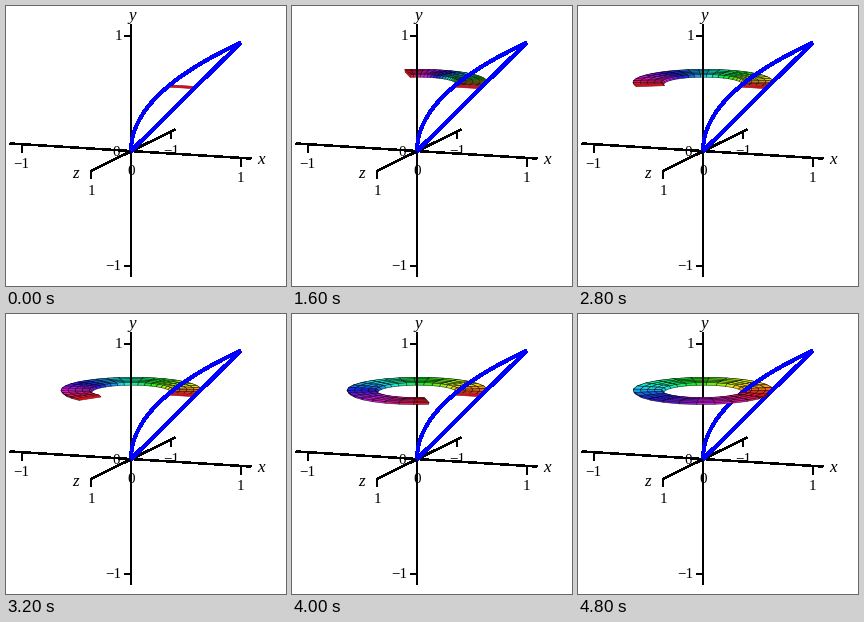
Recreate the animation shown at these times as a matplotlib script. Size 280 by 280 pixels, loop 5 s.

```python
import colorsys

import matplotlib.pyplot as plt
import numpy as np
from matplotlib.animation import FuncAnimation
from matplotlib.collections import PolyCollection

SIZE, DPI = 280, 100
PX = 72 / DPI  # points per pixel
FRAMES, INTERVAL = 25, 200
LOW, HIGH = 0.58, 0.60  # heights bounding the thin slice
RINGS, SECTORS = 4, 24
SLICE_RED, SLICE_EDGE = "#d0101a", "#8a1014"
GRID = (0, 0, 0, 0.75)

ORIGIN = np.array([125.0, 145.0])
BASIS = np.array([[109.5, 6.8], [0.0, -115.0], [-40.0, 20.0]])


def project(x, y, z):
    """Parallel projection from space to stage pixels."""
    return ORIGIN + np.stack(np.broadcast_arrays(x, y, z), axis=-1) @ BASIS


def revolve(radius, height, angle):
    return project(radius * np.cos(angle), height, -radius * np.sin(angle))


def nearness(x, z):
    """Grows towards the viewer."""
    return 40 * x + 109.5 * z


fig = plt.figure(figsize=(SIZE / DPI, SIZE / DPI), dpi=DPI, facecolor="white")
ax = fig.add_axes([0, 0, 1, 1])
ax.set(xlim=(0, SIZE), ylim=(SIZE, 0))
ax.axis("off")


def stroke(points, color="black", width=1.5, zorder=2.0):
    x, y = np.transpose(points)
    ax.plot(x, y, color=color, lw=width * PX, zorder=zorder,
            antialiased=False, solid_capstyle="butt", solid_joinstyle="round")


def label(x, baseline, text, size=15, style="normal"):
    ax.text(x, baseline, text, family="Liberation Serif", style=style,
            size=size * PX, ha="center", va="baseline", zorder=2)


def polygons(zorder):
    return ax.add_collection(
        PolyCollection([], linewidths=0.6 * PX, zorder=zorder), autolim=False)


def draw_axes():
    stroke([(4, 137.5), (245, 152.5)])
    stroke([(125, 18), (125, 271)], width=2)
    stroke([(84.5, 165.2), (169, 123.5)])

    for value in (-1, 1):
        text = "1" if value > 0 else "\u22121"
        for axis, tick in enumerate([(0, 9), (-7, 0), (0, 8)]):
            x, y = ORIGIN + value * BASIS[axis]
            stroke([(x, y), (x + tick[0], y + tick[1])])
            if axis == 1:
                label(112 if value > 0 else 107, y + 4.5, text)
            else:
                label(x, y + 24, text)
    label(110, 149.5, "0")
    label(125.5, 169, "0")

    label(255, 158.5, "x", 17, "italic")
    label(126, 14, "y", 17, "italic")
    label(70, 171.5, "z", 17, "italic")


def draw_region():
    t = np.linspace(0, 1, 80)
    stroke(project(t ** 2, t, 0), "blue", 3, 2.2)
    stroke(project(t, t, 0), "blue", 3, 2.2)


def slice_face(angle):
    """Cross-section between x = y**2 and x = y, turned about the y axis."""
    radii = np.array([LOW ** 2, LOW, HIGH, HIGH ** 2])
    return revolve(radii, np.array([LOW, LOW, HIGH, HIGH]), angle)


# Walls first, then the top face from rim to hole.
top = np.linspace(HIGH ** 2, HIGH, RINGS + 1)
STRIPS = [((LOW, LOW), (HIGH, HIGH)), ((LOW ** 2, LOW), (HIGH ** 2, HIGH))]
STRIPS += [((a, HIGH), (b, HIGH)) for a, b in zip(top[:-1], top[1:])]


def sector_quads(start, end):
    return [[revolve(*a, start), revolve(*b, start),
             revolve(*b, end), revolve(*a, end)] for a, b in STRIPS]


def swept_solid(sweep):
    """Quads, fills and edges behind and in front of the plane z = 0."""
    halves = {True: ([], [], []), False: ([], [], [])}
    angles = np.linspace(0, sweep, SECTORS + 1)
    middles = (angles[:-1] + angles[1:]) / 2
    for j in np.argsort(nearness(np.cos(middles), -np.sin(middles))):
        quads, fills, edges = halves[bool(middles[j] < np.pi)]
        color = colorsys.hsv_to_rgb((j + 0.5) / SECTORS, 0.92, 0.92)
        quads += sector_quads(angles[j], angles[j + 1])
        fills += [color] * len(STRIPS)
        edges += [GRID] * len(STRIPS)

    if nearness(-np.sin(sweep), -np.cos(sweep)) > 0:
        quads, fills, edges = halves[bool(sweep < np.pi)]
        quads.append(slice_face(sweep))
        fills.append(SLICE_RED)
        edges.append(SLICE_EDGE)
    return halves[True], halves[False]


def paint(collection, quads, fills, edges):
    collection.set_verts(quads)
    collection.set_facecolor(fills)
    collection.set_edgecolor(edges)


draw_axes()
draw_region()
paint(polygons(2.1), [slice_face(0)], [SLICE_RED], [SLICE_EDGE])
back, front = polygons(1), polygons(3)


def update(frame):
    empty = ([], [], [])
    sweep = np.radians(15 * frame)
    halves = swept_solid(sweep) if frame else (empty, empty)
    for collection, half in zip((back, front), halves):
        paint(collection, *half)
    return back, front


anim = FuncAnimation(fig, update, frames=FRAMES, interval=INTERVAL,
                     repeat=True, repeat_delay=0)
plt.show()
```
